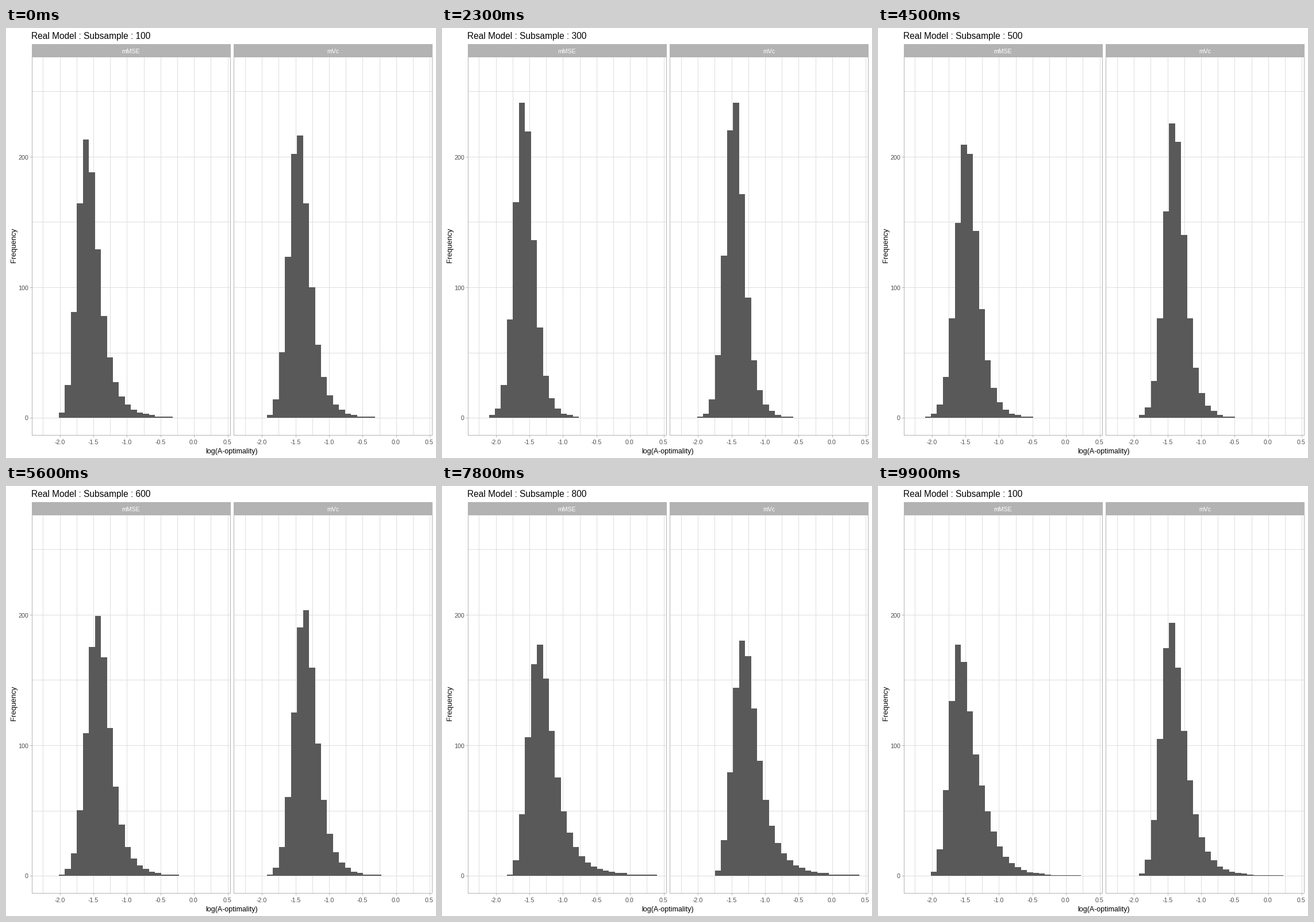
Recreate the animation shown at these times as a matplotlib script. Size 748 by 748 pixels, loop 10000 ms.

```python
import math

import numpy as np
import matplotlib.pyplot as plt
from matplotlib.animation import FuncAnimation
from matplotlib.patches import Rectangle

SIZE, DPI = 748, 64
GREY_BAR, GREY_LINE, GREY_GRID, GREY_TEXT = "#595959", "#B3B3B3", "#DEDEDE", "#4D4D4D"
BINS, BIN_W = 30, 10.45
PANEL_W, PANEL_DX = 346, 351.6
ZERO_Y, UNIT_Y = 678.3, 2.2725
TOP, BOTTOM = 50, 708
SAMPLES, TAIL = 1000, 0.16

# Low, middle and high quantile (16, 50, 84 %) in bin units at each key size
KEY_SIZES = [100, 300, 500, 700, 800, 900]
MMSE = [(6.36, 8.06, 10.39), (6.38, 7.94, 9.72), (7.32, 9.10, 11.15),
        (8.36, 10.32, 12.94), (8.95, 10.97, 13.97), (9.45, 11.75, 14.76)]
MVC = [(7.82, 9.49, 11.63), (7.82, 9.36, 11.15), (8.35, 10.01, 11.92),
       (8.92, 10.91, 13.44), (9.40, 11.37, 14.33), (9.49, 11.92, 14.97)]

SIZES = list(range(100, 1000, 100))
STARTS = [6, 18] + list(range(30, 97, 11))
STEPS = [6, 6] + [5] * 7


def histogram(low, mid, high):
    """Bin counts of a shifted log-logistic curve through three quantiles."""
    ratio = (high - mid) / (mid - low)
    scale = (high - mid) / (ratio - 1)
    shape = math.log(1 / TAIL - 1) / math.log(ratio)
    x = np.maximum(np.arange(BINS + 1) - mid + scale, 1e-3) / scale
    return np.round(SAMPLES * np.diff(1 / (1 + x ** -shape)))


def counts(size):
    return np.array([histogram(*(np.interp(size, KEY_SIZES, q) for q in zip(*keys)))
                     for keys in (MMSE, MVC)])


STATES = {n: counts(n) for n in SIZES}

fig = plt.figure(figsize=(SIZE / DPI, SIZE / DPI), dpi=DPI, facecolor="white")
ax = fig.add_axes([0, 0, 1, 1])
ax.set(xlim=(0, SIZE), ylim=(SIZE, 0))
ax.axis("off")


def box(x, y, w, h, color, z=1):
    return ax.add_patch(Rectangle((x, y), w, h, fc=color, lw=0, aa=False, zorder=z))


def label(x, y, s, px, color="black", ha="center", **kw):
    return ax.text(x, y, s, fontsize=px * 72 / DPI, color=color, ha=ha, va="baseline",
                   family="Liberation Sans", zorder=5, **kw)


def row_of(n):
    return round(ZERO_Y - n * UNIT_Y)


def draw_panel(dx, name):
    x0 = int(45 + dx)
    box(x0, 28, PANEL_W, 22, GREY_LINE)
    label(x0 + PANEL_W / 2 - 0.5, 44, name, 10.5, "white")
    for n in range(0, 300, 50):
        box(x0, row_of(n), PANEL_W, 1, GREY_GRID)
    for j in range(12):
        x = round(64.35 + dx + 29.2 * j)
        box(x, TOP, 1, BOTTOM - TOP, GREY_GRID)
        if j % 2:
            box(x, BOTTOM + 1, 1, 3, GREY_LINE)
            label(x - 0.7, 724, f"{-2.25 + j / 4:.1f}", 10.6, GREY_TEXT)
    for x in (x0, x0 + PANEL_W - 1):
        box(x, TOP, 1, BOTTOM - TOP + 1, GREY_LINE, 4)
    for y in (TOP, BOTTOM):
        box(x0, y, PANEL_W, 1, GREY_LINE, 4)

    edges = [round(60.6 + dx + BIN_W * k) for k in range(BINS + 1)]
    return [box(a, row_of(0), b - a, 0, GREY_BAR, 3) for a, b in zip(edges, edges[1:])]


bars = [draw_panel(0, "mMSE"), draw_panel(PANEL_DX, "mVc")]
for n in (0, 100, 200):
    box(42, row_of(n), 3, 1, GREY_LINE)
    label(39, row_of(n) + 4.5, str(n), 10.7, GREY_TEXT, "right")
label(392, 740, "log(A-optimality)", 12.5)
label(17, 378, "Frequency", 12.7, rotation=90, rotation_mode="anchor")
title = label(44.5, 19, "", 15.5, ha="left")


def pose(i):
    """Return the two neighbouring sizes and the blend between them."""
    k = sum(i >= s for s in STARTS) - 1
    if k < 0:
        return SIZES[0], SIZES[0], 1
    t = min((i - STARTS[k] + 1) / STEPS[k], 1)
    return SIZES[k], SIZES[(k + 1) % len(SIZES)], t


def update(i):
    a, b, t = pose(i)
    heights = STATES[a] * (1 - t) + STATES[b] * t
    base = row_of(0)
    for row, values in zip(bars, heights):
        for bar, v in zip(row, values):
            top = min(math.floor(ZERO_Y - UNIT_Y * v), base)
            bar.set_y(top)
            bar.set_height(base - top)
    title.set_text(f"Real Model : Subsample : {b if t >= 0.5 else a}")
    return []


anim = FuncAnimation(fig, update, frames=100, interval=100, repeat=True, repeat_delay=0)
plt.show()
```
